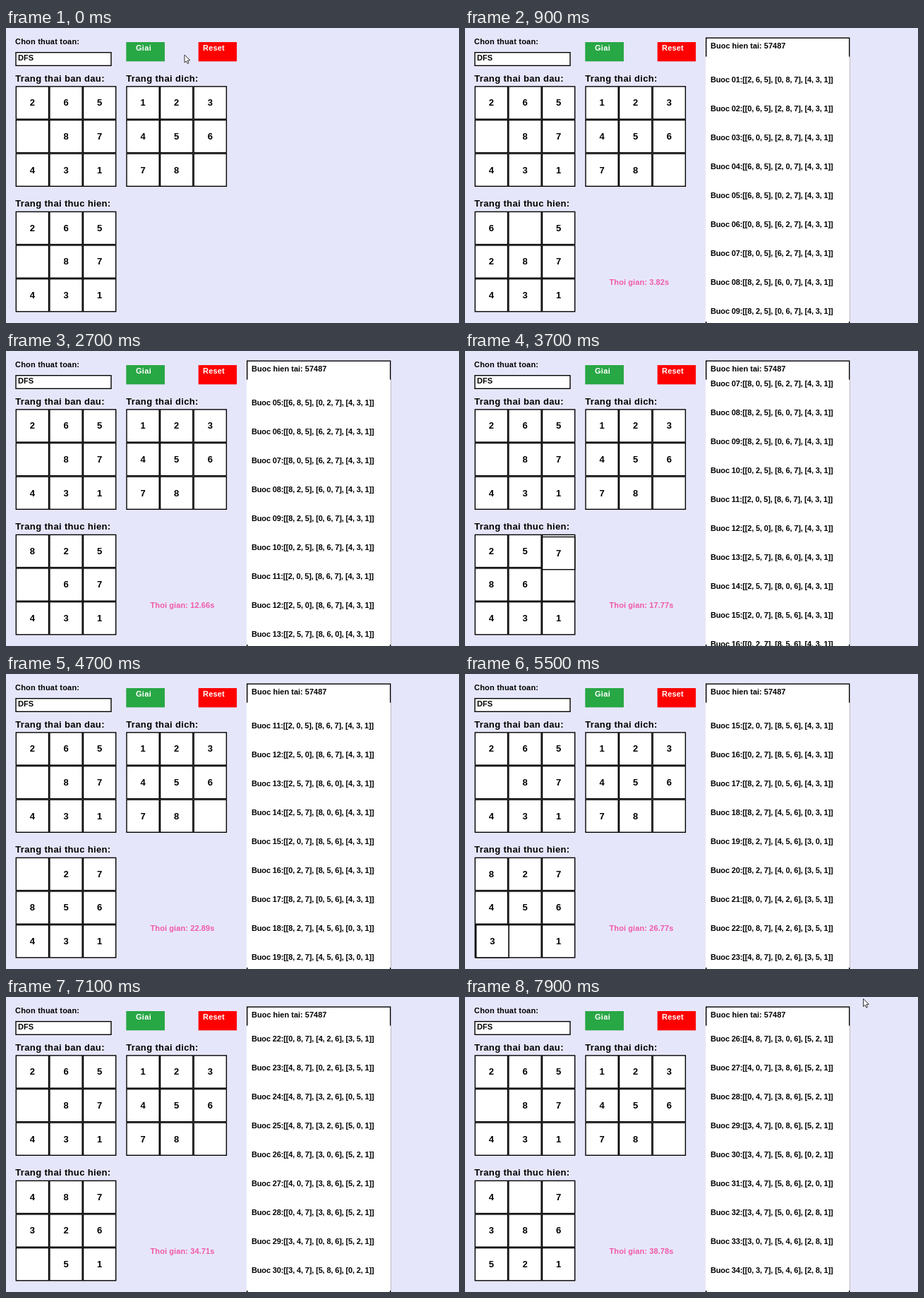
Recreate the animation shown at these times as an HTML page with a canvas. Size 642x418 px, loop 8 s.

```html
<!DOCTYPE html>
<html lang="vi">
<head>
<meta charset="utf-8">
<style>
html, body { margin: 0; width: 100%; height: 100%; overflow: hidden; background: #e6e6fa; }
canvas { display: block; }
</style>
</head>
<body>
<canvas id="stage" width="642" height="418"></canvas>
<script>
const ctx = document.getElementById('stage').getContext('2d');
const LOOP = 8000, TICK = 100, CELL = 47.6, ROW = 41;
const FIRST = 13, PERIOD = 299.45, SLIDE = 100;
const START = [2, 6, 5, 0, 8, 7, 4, 3, 1];
const GOAL = [1, 2, 3, 4, 5, 6, 7, 8, 0];
const MOVES = 'URDLURDLURRDLULDDRUULDDRUULDDRUULDD';
const DELTA = { U: -3, D: 3, L: -1, R: 1 };

// Time in ms, seconds on the clock, wheel notches of the list
const KEYS = [
  [130, 0, 0], [1800, 8.28, 2], [2700, 12.66, 6], [4700, 22.89, 15],
  [5500, 26.77, 21], [6400, 31.15, 27], [7900, 38.78, 38]
];

const steps = [START];
for (const move of MOVES) {
  const next = [...steps[steps.length - 1]];
  const blank = next.indexOf(0), other = blank + DELTA[move];
  next[blank] = next[other];
  next[other] = 0;
  steps.push(next);
}

function lookup(t, col) {
  let i = 0;
  while (i < KEYS.length - 2 && t >= KEYS[i + 1][0]) i++;
  const a = KEYS[i], b = KEYS[i + 1];
  const p = Math.min(1, Math.max(0, (t - a[0]) / (b[0] - a[0])));
  return a[col] + (b[col] - a[col]) * p;
}

function rect(x, y, w, h, color) {
  ctx.fillStyle = color;
  ctx.fillRect(x, y, w, h);
}

function box(x, y, w, h, line = 1.4) {
  rect(x, y, w, h, '#000');
  rect(x + line, y + line, w - 2 * line, h - 2 * line, '#fff');
}

// y is the middle of the capitals
function text(str, x, y, size, { color = '#000', spacing = 0, align = 'left' } = {}) {
  ctx.font = `bold ${size}px "Liberation Sans", Arial, sans-serif`;
  ctx.letterSpacing = spacing + 'px';
  ctx.textAlign = align;
  ctx.fillStyle = color;
  ctx.fillText(str, x, y + size * 0.36);
}

function tile(value, x, y) {
  box(x, y, CELL, CELL);
  if (value) text(value, x + CELL / 2, y + CELL / 2 - 0.3, 13, { align: 'center' });
}

function board(x, y, state, from = state, p = 1) {
  const at = i => [x + (i % 3) * CELL, y + Math.floor(i / 3) * CELL];
  const target = from.indexOf(0), source = state.indexOf(0);
  const sliding = p < 1;
  state.forEach((value, i) => tile(sliding && i === target ? 0 : value, ...at(i)));
  if (sliding) {
    const [x0, y0] = at(source), [x1, y1] = at(target);
    tile(state[target], x0 + (x1 - x0) * p, y0 + (y1 - y0) * p);
  }
}

function cursor(x, y) {
  ctx.beginPath();
  [[0, 0], [0, 11], [2.5, 8.8], [4.3, 12.5], [6, 11.7], [4.4, 8], [7.8, 7.8]]
    .forEach(([dx, dy]) => ctx.lineTo(x + dx, y + dy));
  ctx.closePath();
  ctx.fillStyle = '#fff';
  ctx.strokeStyle = '#333';
  ctx.lineWidth = 1;
  ctx.fill();
  ctx.stroke();
}

function panel(t) {
  box(341, 13.4, 204.4, 420);
  text('Buoc hien tai: 57487', 348, 25.2, 11);
  rect(341, 40.6, 204.4, 375.4, '#fff');
  ctx.save();
  ctx.beginPath();
  ctx.rect(341, 40, 205, 378);
  ctx.clip();
  const scroll = Math.floor(lookup(t, 2)) * ROW * 2 / 3;
  steps.forEach((s, i) => {
    const y = 73.2 + i * ROW - scroll;
    if (y < 42 || y > 425) return;
    const rows = [0, 3, 6].map(k => `[${s.slice(k, k + 3).join(', ')}]`).join(', ');
    text(`Buoc ${String(i + 1).padStart(2, '0')}:[${rows}]`, 348, y, 11, { spacing: -0.15 });
  });
  ctx.restore();
}

function draw(t) {
  rect(0, 0, 642, 418, '#e6e6fa');
  text('Chon thuat toan:', 13, 18.8, 11, { spacing: 0.2 });
  box(13.3, 34, 136.4, 20);
  text('DFS', 17, 42.2, 11);
  rect(170.3, 20, 54.7, 27.3, '#28a745');
  rect(272.7, 20, 54.4, 27.3, '#f00');
  text('Giai', 184, 28.4, 11, { color: '#fff', spacing: 0.3 });
  text('Reset', 279, 28.4, 11, { color: '#fff', spacing: 0.2 });

  const label = { spacing: 0.35 };
  text('Trang thai ban dau:', 13.3, 71.5, 13, label);
  text('Trang thai dich:', 170.3, 71.5, 13, label);
  text('Trang thai thuc hien:', 13.3, 248.5, 13, label);
  board(13.6, 82.2, START);
  board(170.3, 82.2, GOAL);

  // Each move slides for a moment, then rests
  const phase = (t - FIRST) / PERIOD;
  const n = Math.max(0, Math.floor(phase));
  const p = Math.min(1, (phase - n) * PERIOD / SLIDE);
  board(13.6, 259.7, steps[n], steps[Math.max(0, n - 1)], n ? p : 1);

  if (t >= 200) {
    text(`Thoi gian: ${lookup(t, 1).toFixed(2)}s`, 204.5, 360, 11,
      { color: '#f05aaa', spacing: 0.1 });
    panel(t);
  }

  if (t < 100) cursor(253, 38);
  else if (t < 300) cursor(206, 34);
  else if (t < 400) cursor(546, 180);
  else if (t >= 7800) cursor(564.5, 2.5);
}

function frame(now) {
  draw(Math.floor((now % LOOP) / TICK) * TICK);
  requestAnimationFrame(frame);
}
requestAnimationFrame(frame);
</script>
</body>
</html>
```
